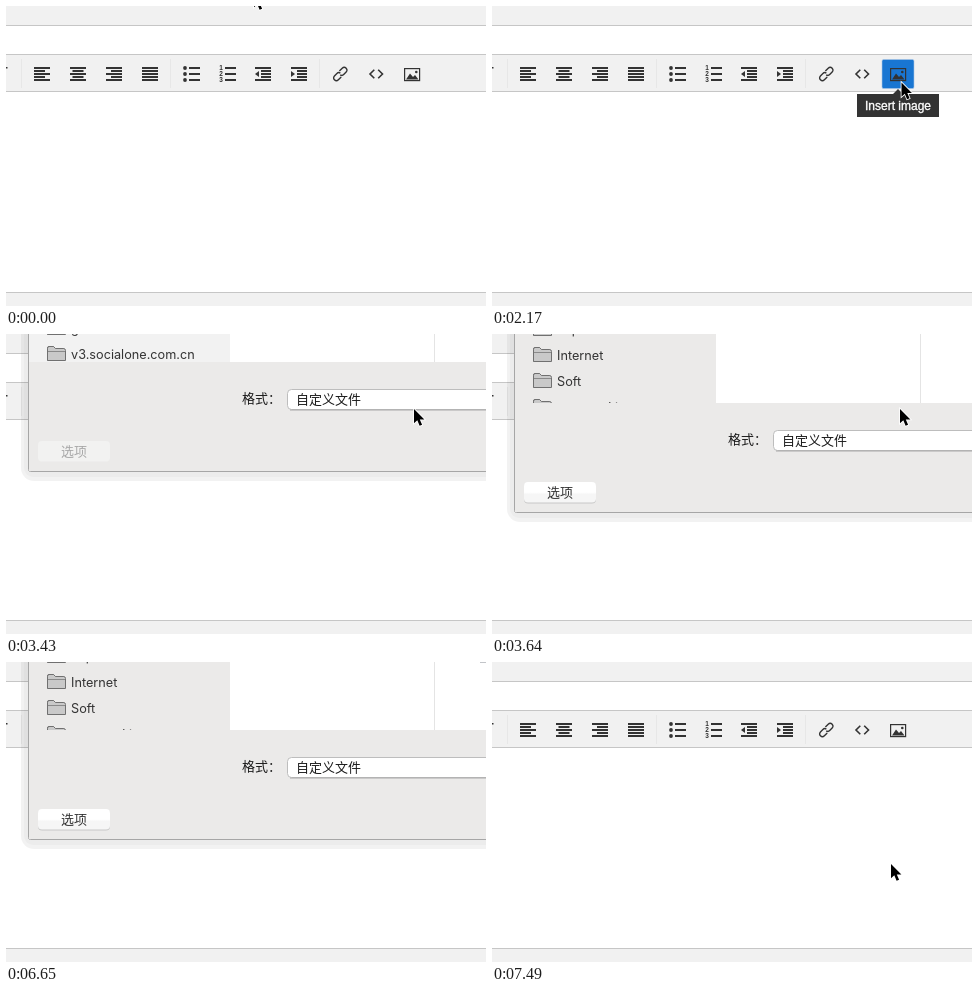
Write an HTML page that moves like this. It is 480 px wide and 300 px high and loops after 8000 ms.

```html
<!DOCTYPE html>
<html lang="en">
<head>
<meta charset="utf-8">
<title>Insert image</title>
<style>
  html, body { margin: 0; width: 100%; height: 100%; overflow: hidden; background: #fff; }
  svg { display: block; width: 480px; height: 300px; }
  .label { font: 12.7px Inter, sans-serif; fill: #333; }
  .cjk { font: 13px "Noto Sans CJK SC", "Noto Sans CJK", sans-serif; fill: #1a1a1a; }
  .tip { font: 12px "Liberation Sans", Arial, sans-serif; fill: #fff; stroke: #fff; stroke-width: .35; }
  .digit { font: bold 6.5px "Liberation Sans", Arial, sans-serif; }
</style>
</head>
<body>
<svg viewBox="0 0 480 300">
  <defs>
    <linearGradient id="buttonFill" x2="0" y2="1">
      <stop offset=".5" stop-color="#fff"/>
      <stop offset=".6" stop-color="#f6f6f6"/>
    </linearGradient>
    <g id="folder" stroke="#707070" fill="#c9c9c9">
      <path d="M41.5 6.5V-6q0-1.5 1.5-1.5h4.5l2 2H58q1.500 1.500 1.500V6.500z" fill="#d8d8d8"/>
      <path d="M41.500 6.500V-5.500q0-2 1.500-2h4.500l2 2h8q2 0 2 2v10z"/>
      <path d="M42-2.500h17" stroke="#8a8a8a"/>
    </g>
  </defs>

  <!-- editor page -->
  <path d="M0 0h480v19H0zM0 49h480v36H0zM0 287h480v13H0z" fill="#f1f1f1"/>
  <path d="M0 19.500h480M0 48.500h480M0 85.500h480M0 286.500h480" stroke="#c6c6c6"/>
  <path d="M15.500 53v29M164.500 53v29M313.500 53v29" stroke="#e7e7e7"/>
  <rect id="hover" x="390" y="53.500" width="32" height="29" rx="1.500" fill="#1976d2" stroke="#a9c6e6" stroke-width=".6"/>
  <g id="icons" fill="#333">
    <rect y="61" width="1.500" height="1.500"/>
    <g fill="none" stroke="#333" stroke-width="1.400">
      <g transform="translate(334.300 68) rotate(-45)">
        <path d="M-1.500 2.800H-5.500a2.800 2.800 0 0 1 0-5.600H-2a2.800 2.800 0 0 1 2.700 2.200M1.500-2.800h4a2.800 2.800 0 0 1 0 5.600H2A2.800 2.800 0 0 1-.7.600"/>
      </g>
      <path d="M368.300 63.800l-4.300 4.200 4.300 4.200M372.200 63.800l4.300 4.200-4.300 4.200" stroke-width="1.600"/>
      <rect x="398.600" y="62.600" width="15" height="12" stroke-width="1.200"/>
    </g>
    <path d="M400 73.500l4-6 3 3.500 2-2 3.500 4.500z"/>
    <circle cx="410.300" cy="66" r="1.300"/>
  </g>
  <g id="tooltip">
    <path d="M365 88h36l5-5 5 5h36v23h-82z" fill="#333"/>
    <text class="tip" x="373" y="104">Insert image</text>
  </g>

  <!-- file sheet; y = 0 is its bottom edge -->
  <g id="sheet">
    <rect x="15" y="-500" width="600" height="509" rx="13" opacity=".05"/>
    <rect x="18" y="-500" width="600" height="505" rx="9" opacity=".025"/>
    <rect x="22.500" y="-500" width="600" height="499.500" rx="2" fill="#ebeae9" stroke="#a6a6a6"/>
    <rect id="sidebar" x="23" y="-500" width="201" height="390"/>
    <path d="M224-500h256v390H224z" fill="#fff"/>
    <path d="M428.500-500v390" stroke="#e4e4e4"/>
    <rect id="mark" x="474" y="-179" width="6" height="1.500" fill="#858990"/>
    <g id="waitingRows"></g>
    <g id="readyRows"></g>
    <path d="M23-110h457V-1H23z" fill="#ebeae9"/>
    <text class="cjk" x="236" y="-69" font-weight="500" style="font-weight:500">格式：</text>
    <rect x="281.500" y="-82.500" width="240" height="20" rx="4" fill="#fff" stroke="#bdbdbd"/>
    <path d="M284-62h200" stroke="#a9a9a9"/>
    <text class="cjk" x="290" y="-68">自定义文件</text>
    <rect id="buttonEdge" x="32" y="-30" width="72" height="20.500" rx="4" fill="#c8c8c8"/>
    <rect id="button" x="32" y="-31" width="72" height="20.500" rx="4"/>
    <text id="buttonText" class="cjk" x="55" y="-16">选项</text>
  </g>

  <path id="cursor" d="M0 0v14.300l3.300-3 2.300 5.400 2.500-1-2.300-5.300h4.600z" stroke="#fff" stroke-width="1.600" paint-order="stroke"/>
</svg>
<script>
const $ = id => document.getElementById(id);
const LOOP = 8000, STEP = 70;

// Toolbar icons built from horizontal bars
const bar = (x, y, w) => `<rect x="${x}" y="${y}" width="${w}" height="2"/>`;
const rows = [61, 64, 67, 70, 73];
let icons = '';
[[28, 0], [64, .5], [100, 1], [136, null]].forEach(([x, align]) => {
  rows.forEach((y, i) => {
    const w = i % 2 && align !== null ? 11 : 16;
    icons += bar(x + (16 - w) * (align || 0), y, w);
  });
});
[61, 67, 73].forEach((y, i) => {
  icons += `<circle cx="179" cy="${y + 1}" r="1.900"/>` + bar(183, y, 11) + bar(219, y, 11)
    + `<text class="digit" x="213.300" y="${y + 3.300}">${i + 1}</text>`;
});
[[249, 'M249 68l4-3v6z'], [285, 'M289 68l-4-3v6z']].forEach(([x, arrow]) => {
  icons += rows.map((y, i) => i % 4 ? bar(x + 6, y, 10) : bar(x, y, 16)).join('') + `<path d="${arrow}"/>`;
});
$('icons').innerHTML += icons;

const folderRows = (names, top) => names.map((name, i) => {
  const y = top + 26 * i;
  return `<use href="#folder" y="${y}"/><text class="label" x="65" y="${y + 4.500}">${name}</text>`;
}).join('');
$('waitingRows').innerHTML = folderRows(['git', 'v3.socialone.com.cn'], -144);
$('readyRows').innerHTML = folderRows(['Top', 'Internet', 'Soft', 'screens.kit'], -184);

const smooth = p => p * p * (3 - 2 * p);

// Keys are [time, ...values]; null values mean hidden
function sample(keys, t, ease) {
  let i = keys.length - 1;
  while (i && keys[i][0] > t) i--;
  const a = keys[i], b = keys[i + 1];
  if (!ease || !b) return a.slice(1);
  const p = smooth(Math.max(0, (t - a[0]) / (b[0] - a[0])));
  return a.slice(1).map((v, k) => v + (b[k + 1] - v) * p);
}

const approach = [[560, 248, -13], [1050, 443, 78], [1260, 409.500, 76.500]];
const rests = [[0, 409.500, 76.500], [2310, 409, 76], [2380, 408, 75], [3780, 399.500, 32.500],
  [3850, null, null], [7420, 402, 199.500], [7490, 399, 202]];
const sheetBottom = [[0, null], [3360, 45], [3430, 138], [3500, 168], [3570, 177], [3640, 179],
  [6650, 178], [6720, 130], [6790, 21], [6860, null]];

const show = (id, on) => $(id).style.display = on ? '' : 'none';

function draw(now) {
  const t = Math.floor((now % LOOP) / STEP + 1e-6) * STEP;

  const [x, y] = t < 1260 ? sample(approach, t, true) : sample(rests, t);
  show('cursor', x !== null);
  if (x !== null) $('cursor').setAttribute('transform', `translate(${x} ${y})`);

  show('hover', t >= 2170 && t < 3640);
  show('tooltip', t >= 2170 && t < 2800);

  const [bottom] = sample(sheetBottom, t);
  show('sheet', bottom !== null);
  if (bottom !== null) $('sheet').setAttribute('transform', `translate(0 ${bottom})`);

  const ready = t >= 3640;
  show('waitingRows', !ready);
  show('readyRows', ready);
  show('buttonEdge', ready);
  show('mark', t >= 4970);
  $('sidebar').setAttribute('fill', ready ? '#ebeae9' : '#f2f2f2');
  $('button').setAttribute('fill', ready ? 'url(#buttonFill)' : '#f2f2f1');
  $('buttonText').style.fill = ready ? '#333' : '#a8a8a8';
}

const start = performance.now();
function tick() {
  draw(performance.now() - start);
  requestAnimationFrame(tick);
}
tick();
</script>
</body>
</html>
```
